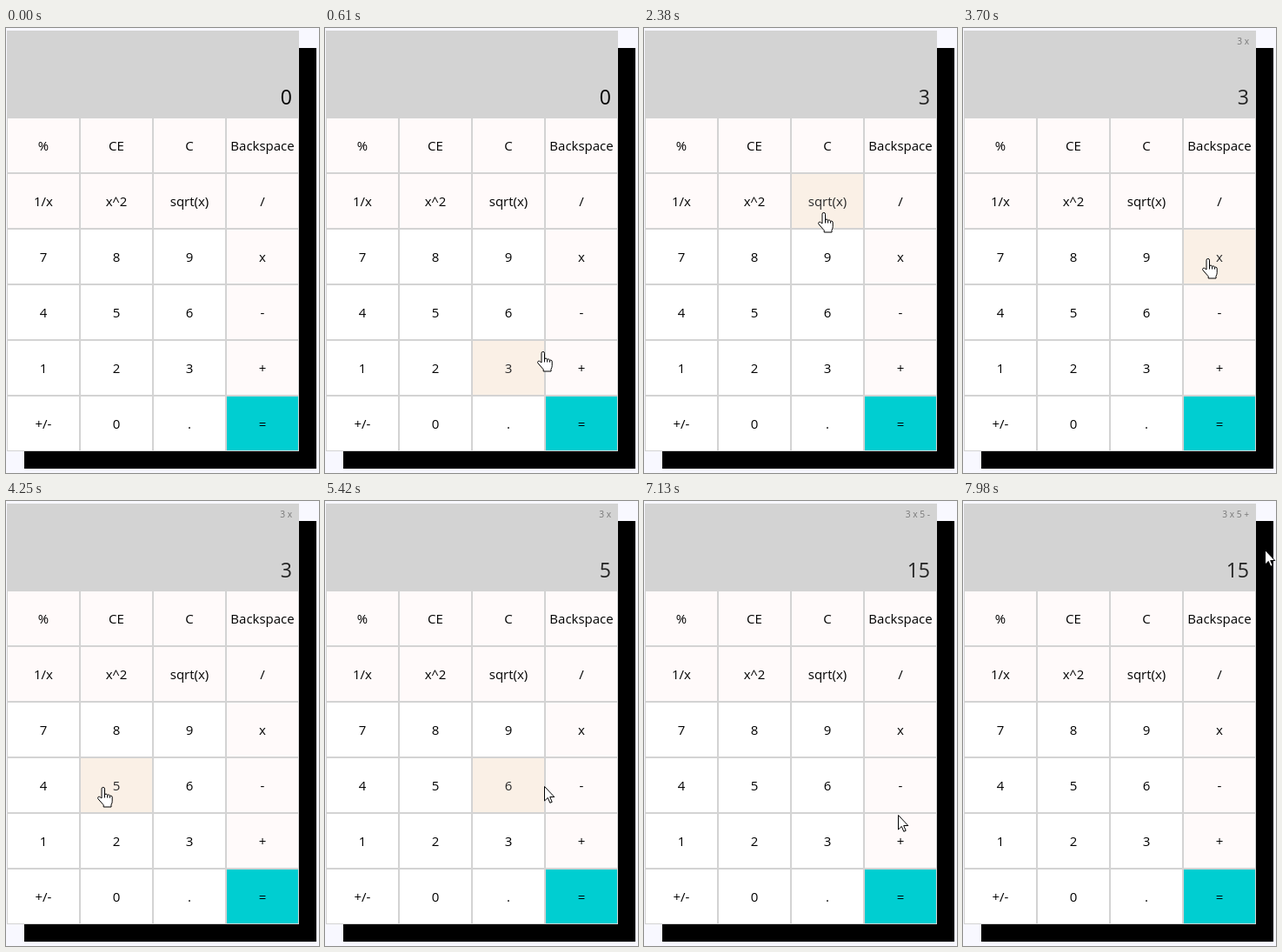
Animation, 360 px wide and 512 px high, one loop 8 s. Source, as an HTML page:

```html
<!DOCTYPE html>
<html lang="en">
<head>
<meta charset="utf-8">
<title>Calculator</title>
<style>
  html, body { margin: 0; width: 100%; height: 100%; overflow: hidden; background: #f8f8ff; }
  svg { display: block; font-family: "Open Sans", "Noto Sans", sans-serif; }
  .key text { font-size: 15px; text-anchor: middle; }
  .op rect { fill: #fffafa; }
  .num rect { fill: #fff; }
  .eq rect { fill: #00ced1; }
  .hover rect { fill: #faf0e6; }
  .hover text { fill: #2b2b2b; }
  .pressed text { fill: #555; }
  #value { font-size: 23px; text-anchor: end; }
  #expr { font-size: 10.2px; text-anchor: end; fill: #777; }
  .cursor { fill: #fff; stroke: #000; stroke-linejoin: round; visibility: hidden; }
</style>
</head>
<body>
<svg width="360" height="512" viewBox="0 0 360 512">
  <rect x="21" y="23" width="336" height="484"/>
  <rect x="1" y="3" width="336" height="484" fill="#d3d3d3"/>
  <text id="expr" x="329" y="19"></text>
  <text id="value" x="329" y="88">0</text>
  <g id="keys"></g>
  <path id="arrow" class="cursor" d="M.5.5V17l3.8-3.6 2.5 5.9 2.4-1-2.5-5.8h5.1z"/>
  <path id="hand" class="cursor" d="M5 13V2.2a1.75 1.75 0 0 1 3.5 0V9.2q.3-1.2 1.6-1.1 1.4.1 1.5 1.6.5-.9 1.6-.7 1.2.2 1.3 1.6.4-.7 1.4-.5 1.3.3 1.3 1.9v4.5q0 2-1.2 4v2.5H7.2v-2.2L1 13.8Q.1 12.2 1.2 11.4q1.1-.7 2.2.4zM8.5 9v3.5M11.6 9.7v2.8M14.5 10.6v2"/>
</svg>
<script>
const LOOP = 8000;
const COL = 84, ROW = 64, LEFT = 1, TOP = 103;
const $ = id => document.getElementById(id);

const labels = ['%', 'CE', 'C', 'Backspace', '1/x', 'x^2', 'sqrt(x)', '/',
  '7', '8', '9', 'x', '4', '5', '6', '-', '1', '2', '3', '+', '+/-', '0', '.', '='];

$('keys').innerHTML = labels.map((label, i) => {
  const col = i % 4, row = Math.floor(i / 4);
  const x = LEFT + col * COL, y = TOP + row * ROW;
  const kind = label === '=' ? 'eq' : row < 2 || col === 3 ? 'op' : 'num';
  return `<g class="key ${kind}"><rect x="${x + 1}" y="${y + 1}" width="82" height="62"/>` +
    `<text x="${x + 42}" y="${y + 38}">${label}</text></g>`;
}).join('');
const keys = [...$('keys').children];

// Pointer moves: start, end, steps, target x, target y
const origin = [332, 559];
const moves = [
  [380, 990, 9, 207, 273],
  [1690, 1920, 4, 206, 212],
  [3160, 3390, 4, 281, 265],
  [3940, 4250, 5, 111, 329],
  [5270, 5570, 5, 286, 327],
  [7130, 7210, 2, 294, 373],
  [7670, 7980, 5, 347, 55]
];

// Clicks: press, release, value, expression
const clicks = [
  [1230, 1310, '9', ''],
  [2300, 2380, '3', ''],
  [3620, 3700, '3', '3 x'],
  [4640, 4790, '5', '3 x'],
  [6120, 6280, '15', '3 x 5 -'],
  [7370, 7440, '15', '3 x 5 +']
];

const easeOut = p => 1 - Math.pow(1 - p, 1.8);

function pointerAt(t) {
  let from = origin, pos = null;
  for (const [start, end, steps, x, y] of moves) {
    if (t < start) break;
    const gap = (end - start) / (steps - 1);
    const step = Math.min(steps, Math.floor((t - start + 2) / gap) + 1);
    const k = easeOut(step / steps);
    pos = [from[0] + (x - from[0]) * k, from[1] + (y - from[1]) * k];
    from = [x, y];
  }
  return pos;
}

function hitTest([x, y]) {
  const dx = x - LEFT, dy = y - TOP;
  const inside = dx >= 0 && dx < 4 * COL && dy >= 0 && dy < 6 * ROW;
  const rowGap = dy % ROW < 1 || dy % ROW > ROW - 1;
  const colGap = dx % COL < 1 || dx % COL > COL - 1;
  return {
    key: inside && !rowGap ? Math.floor(dy / ROW) * 4 + Math.floor(dx / COL) : -1,
    hand: inside && !rowGap && !colGap
  };
}

function place(el, visible, x, y) {
  el.style.visibility = visible ? 'visible' : 'hidden';
  if (visible) el.setAttribute('transform', `translate(${x} ${y})`);
}

function draw(t) {
  const pos = pointerAt(t);
  const hit = pos ? hitTest(pos) : { key: -1, hand: false };
  const [x, y] = (pos || origin).map(Math.round);
  place($('hand'), pos && hit.hand, x - 6, y);
  place($('arrow'), pos && !hit.hand, x, y + 1);

  const down = clicks.some(([press, release]) => t >= press && t < release);
  keys.forEach((key, i) => {
    key.classList.toggle('hover', i === hit.key);
    key.classList.toggle('pressed', down && i === hit.key);
  });

  const done = clicks.filter(c => t >= c[1]).pop();
  $('value').textContent = done ? done[2] : '0';
  $('value').style.fill = done ? '#222' : '#000';
  $('expr').textContent = done ? done[3] : '';
}

const began = performance.now();
function tick() {
  draw((performance.now() - began) % LOOP);
  requestAnimationFrame(tick);
}
tick();
</script>
</body>
</html>
```
